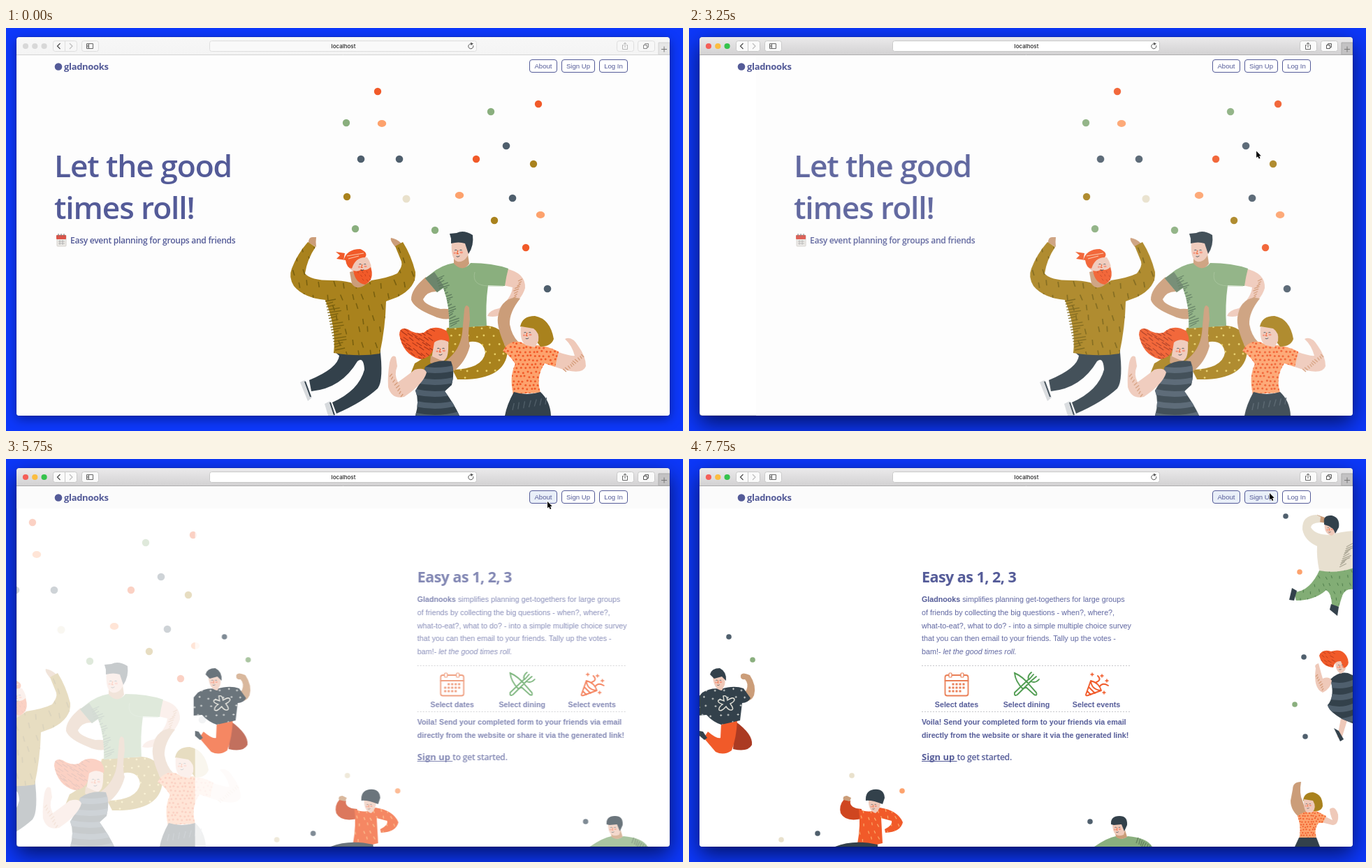
Recreate the animation shown at these times as an HTML page with a canvas. Size 969 px wide and 578 px high, loop 8 s.

```html
<!DOCTYPE html>
<html lang="en">
<head>
<meta charset="utf-8">
<title>Event planner</title>
<style>
html, body { margin: 0; width: 100%; height: 100%; overflow: hidden; background: #0d38fa; }
canvas { display: block; width: 969px; height: 578px; }
</style>
</head>
<body>
<canvas id="stage" width="969" height="578"></canvas>
<script>
const W = 969, H = 578, LOOP = 8000, STEP = 250;
const WIN = { x: 15, y: 13, w: 935, h: 543 };
const stage = document.getElementById('stage').getContext('2d');
let g = stage;

const INK = '#545b98', RED = '#f15a29', GREEN = '#8aaf7e', PEACH = '#fda26d', SLATE = '#4f5f6d',
  DARK = '#33414b', MUSTARD = '#a9821d', CREAM = '#e9e1cc', TAN = '#cb9d79', PALE = '#efc9b9';
const SANS = '"Liberation Sans", Arial, sans-serif', DISPLAY = '"Open Sans", sans-serif';

// ---- drawing helpers ----
function fill(color, d) {
  const p = new Path2D(d);
  g.fillStyle = color;
  g.fill(p);
  return p;
}
function line(color, width, d) {
  g.strokeStyle = color;
  g.lineWidth = width;
  g.stroke(new Path2D(d));
}
function dot(color, x, y, rx, ry = rx) {
  g.fillStyle = color;
  g.beginPath();
  g.ellipse(x, y, rx, ry, 0, 0, Math.PI * 2);
  g.fill();
}
function box(x, y, w, h, r, color, edge, width = 1) {
  g.beginPath();
  g.roundRect(x, y, w, h, r);
  if (color) { g.fillStyle = color; g.fill(); }
  if (edge) { g.strokeStyle = edge; g.lineWidth = width; g.stroke(); }
}
function text(str, x, y, font, color = INK, spacing = 0) {
  g.font = font;
  g.letterSpacing = spacing + 'px';
  g.fillStyle = color;
  g.fillText(str, x, y);
  return x + g.measureText(str).width;
}
function display(str, x, y, size, weight = 600) {
  return text(str, x, y, `${weight} ${size}px ${DISPLAY}`, INK, -0.025 * size);
}
function centered(str, x, y, font, color) {
  g.textAlign = 'center';
  text(str, x, y, font, color);
  g.textAlign = 'left';
}
function confetti(color, points, rx = 5, ry = rx) {
  points.forEach(([x, y]) => dot(color, x, y, rx, ry));
}

// Fills a shape with a jittered grid of small marks.
function texture(path, [x, y, w, h], gap, mark) {
  let seed = 7;
  const rnd = () => (seed = seed * 16807 % 2147483647) / 2147483647 - 0.5;
  g.save();
  g.clip(path);
  for (let row = 0, py = y; py < y + h; py += gap, row++)
    for (let px = x + (row % 2) * gap / 2; px < x + w; px += gap)
      mark(px + rnd() * gap * 0.4, py + rnd() * gap * 0.4, rnd());
  g.restore();
}
const spots = (color, r) => (x, y) => dot(color, x, y, r);
const dashes = (color, dx, dy, width = 1.6) => (x, y, k) =>
  line(color, width, `M${x},${y} l${dx + k * 3},${dy}`);
function hatch(color, x1, y1, x2, y2, n, len, rise = -3) {
  for (let i = 0; i <= n; i++) {
    const x = x1 + (x2 - x1) * i / n, y = y1 + (y2 - y1) * i / n;
    line(color, 1.3, `M${x},${y} l${len * (0.75 + 0.25 * Math.sin(i * 5))},${rise}`);
  }
}
function face(x, y, s = 1) {
  g.save();
  g.translate(x, y);
  g.scale(s, s);
  line(DARK, 1.1, 'M-6,-4 q2,-1.5 4,0 M3,-4 q2,-1.5 4,0 M-3,7 q3,2 6,-1');
  dot('#f59079', -6, 1, 2.2, 1.6);
  dot('#f59079', 6, 0, 2.8, 1.8);
  line(RED, 1.4, 'M0,-4 L-2,2 L1,2');
  g.restore();
}
function stripes(path, x, y, w, h) {
  g.save();
  g.clip(path);
  for (let py = y; py < y + h; py += 17)
    line(SLATE, 8, `M${x},${py} Q${x + w / 2},${py + 9} ${x + w},${py - 2}`);
  g.restore();
}

// ---- landing page ----
function beardedMan() {
  fill('#d7dadd', 'M421,508 L428,505 L438,530 L432,535 Z M456,539 L464,535 L471,556 L461,556 Z');
  line(DARK, 2, 'M428,507 L436,529 M464,537 L470,555');
  fill(DARK, 'M470,464 Q505,472 535,457 Q541,505 532,517 Q510,537 473,553 L467,537 Q505,520 513,490 Q512,471 503,478 Q480,517 437,521 L434,505 Q475,488 477,470 Z');
  fill(TAN, 'M433,308 Q433,299 440,300 L444,300 Q443,307 444,314 Z M557,314 Q549,304 551,301 Q559,302 566,309 Z');
  const d = 'M432,307 L443,314 Q431,332 428,352 Q435,362 466,362 Q481,362 493,365 Q508,375 523,362 Q548,358 560,352 Q568,342 566,335 L557,313 L568,307 Q580,326 586,350 Q588,372 560,386 L544,392 Q543,430 535,467 Q505,472 469,466 Q473,430 457,390 Q426,387 412,370 Q404,357 409,345 Q417,324 432,307 Z';
  const top = fill(MUSTARD, d);
  texture(top, [408, 312, 180, 155], 17, dashes('#79600f', 2, 8));
  hatch('#79600f', 457, 392, 471, 462, 17, 20);
  fill(TAN, 'M492,350 L502,347 L517,366 Q503,378 495,367 Z');
  fill(PALE, 'M491,344 Q489,331 503,328 L517,329 Q525,340 522,350 L504,357 Z');
  fill(RED, 'M483,334 Q487,317 507,317 Q519,322 514,329 Q500,329 495,345 Q488,345 486,333 L473,331 L478,326 L472,321 L485,323 Z');
  fill(RED, 'M497,348 Q505,350 508,346 Q516,349 522,343 Q528,361 514,368 Q500,366 497,348 Z');
  line('#fbc7a7', 1.2, 'M488,327 L512,323 M490,331 L505,327');
  texture(new Path2D('M498,350 Q520,346 523,348 Q526,364 514,367 Z'), [498, 348, 28, 20], 6, dashes('#c9401b', 1, 3, 1));
  face(510, 342, 0.75);
}
function tallMan() {
  fill(MUSTARD, 'M620,446 Q606,470 585,481 L573,511 L600,506 L640,470 Z');
  const legs = fill(MUSTARD, 'M631,430 L689,427 Q719,430 718,463 Q715,506 646,504 L639,490 Q682,489 686,466 Q684,448 664,450 Q653,456 652,476 L620,490 Z');
  texture(legs, [620, 430, 100, 75], 12, spots('#e8cf67', 1.4));
  fill(PALE, 'M715,345 Q744,351 743,373 Q738,391 715,405 Q705,417 689,413 Q691,405 706,402 Q724,386 725,372 L712,369 Z');
  hatch('#d49b78', 739, 360, 728, 392, 9, -8, 3);
  fill(TAN, 'M601,357 Q579,375 580,390 Q584,402 612,413 Q626,420 641,416 L646,405 Q632,402 622,403 Q599,397 597,389 Q603,377 617,378 Z');
  const shirt = fill(GREEN, 'M609,352 Q623,340 641,337 Q655,350 665,337 Q696,337 719,345 Q716,356 714,370 L690,369 Q686,398 688,427 L634,431 Q636,400 626,373 L617,379 L600,359 Z');
  fill('#6c856c', 'M613,350 L600,359 L617,379 L627,371 Z');
  g.save(); g.clip(shirt);
  hatch('#5d7b5d', 616, 360, 636, 428, 20, 15, -5);
  g.restore();
  line('#a6c39a', 0.8, 'M671,350 Q666,369 690,370 L712,370');
  fill(TAN, 'M641,331 L661,324 L663,338 Q654,351 641,338 Z');
  fill(PALE, 'M638,304 L657,306 L664,318 Q659,337 646,335 Q636,332 638,304 Z');
  fill(DARK, 'M637,302 L635,295 L645,294 Q655,289 668,297 Q670,312 662,324 L657,309 Q648,306 637,309 Z');
  face(647, 322, 0.8);
}
function redHairedWoman() {
  fill(TAN, 'M656,404 Q658,394 663,401 L664,418 Q660,445 664,456 Q658,479 641,492 L630,477 Q650,462 653,437 Z');
  const hair = fill(RED, 'M563,440 Q563,428 575,432 Q587,440 598,437 Q612,424 630,434 Q636,444 634,450 Q615,446 612,459 Q608,474 592,475 Q568,468 563,440 Z');
  texture(hair, [563, 430, 44, 48], 7, dashes('#aa3519', 7, 5, 1.1));
  fill(PALE, 'M613,451 Q622,444 633,450 Q634,470 629,475 L622,482 L609,474 Z');
  fill(TAN, 'M608,470 L621,476 L628,478 Q618,486 607,480 Z');
  face(622, 463, 0.8);
  const dress = fill(DARK, 'M600,486 Q615,475 637,478 Q643,492 638,512 L628,521 Q642,540 649,556 L586,556 Q592,535 586,520 Q596,505 600,486 Z');
  stripes(dress, 582, 487, 70, 80);
  fill(PALE, 'M549,480 Q552,467 558,472 L560,485 Q555,497 561,508 Q575,498 585,490 Q599,486 602,494 Q598,510 570,529 Q552,533 547,515 Q546,498 549,480 Z');
  hatch('#d49b78', 549, 500, 565, 529, 7, 5, -4);
}
function blondeWoman() {
  fill(TAN, 'M711,396 Q721,384 736,388 Q720,408 721,425 Q724,441 733,450 L716,460 Q702,430 704,415 Q706,402 711,396 Z');
  fill(PALE, 'M788,464 Q808,471 814,470 Q810,455 800,446 Q810,441 819,456 Q830,471 830,485 Q825,500 786,486 Z');
  hatch('#d49b78', 827, 472, 802, 493, 9, -5, -4);
  const top = fill(PEACH, 'M716,456 Q730,444 745,455 Q770,453 791,464 L786,486 L771,481 Q758,500 765,523 L726,525 Q720,500 729,482 Q722,470 711,463 Z');
  texture(top, [710, 446, 82, 80], 6, spots(RED, 1.5));
  fill(DARK, 'M727,522 Q745,528 765,522 Q779,535 780,556 L714,556 Q717,540 727,522 Z');
  hatch('#52606a', 725, 548, 772, 540, 6, 3, -10);
  fill(MUSTARD, 'M736,428 Q739,413 757,413 Q779,417 784,446 Q780,457 765,457 L752,440 Z');
  fill(PALE, 'M737,428 L755,431 Q764,437 762,449 L757,458 L745,455 Q735,451 737,428 Z');
  face(746, 440, 0.75);
}
function notepad(x, y) {
  box(x, y, 13, 16, 1, '#eceae6', '#d5d2ce');
  box(x - 1, y, 14, 6, 1, '#dc5348');
  line('#a9a9aa', 0.8, `M${x + 2},${y + 9} h9 M${x + 2},${y + 12} h9 M${x + 4},${y + 7} v7 M${x + 8},${y + 7} v7`);
  line('#777', 1, `M${x + 2},${y - 2} v4 M${x + 6},${y - 2} v4 M${x + 10},${y - 2} v4`);
}
function landing() {
  g.fillStyle = '#fdfdfd';
  g.fillRect(15, 38, 935, 518);
  display('Let the good', 69, 214, 44.3);
  display('times roll!', 69, 274, 44.3);
  notepad(73, 297);
  display('Easy event planning for groups and friends', 92, 309, 12.1);
  confetti(RED, [[532, 91], [762, 109], [673, 188], [744, 315]], 5.2);
  confetti(GREEN, [[694, 120], [487, 136], [500, 288], [614, 290]], 5.2);
  confetti(PEACH, [[538, 137], [649, 240], [765, 268]], 6.2, 5);
  confetti(SLATE, [[508, 188], [563, 188], [716, 169], [725, 244], [775, 374]], 5.3);
  confetti(MUSTARD, [[755, 195], [488, 242], [699, 276]], 5.2);
  confetti(CREAM, [[573, 245]], 5.5);
  beardedMan();
  tallMan();
  redHairedWoman();
  blondeWoman();
}

// ---- about page ----
function starShirtMan() {
  fill('#ab3a22', 'M66,376 Q92,395 90,410 Q84,421 63,416 Z');
  fill(RED, 'M46,379 L69,374 Q68,400 61,418 Q50,426 38,420 L21,400 L27,391 Q40,402 45,400 Z');
  fill(DARK, 'M15,390 L20,391 L26,400 L22,403 L15,397 Z');
  fill(TAN, 'M76,347 Q88,350 93,339 Q97,325 87,310 Q76,305 74,310 Q73,317 80,316 Q86,322 82,332 L74,336 Z');
  const shirt = fill(DARK, 'M19,335 Q32,327 46,330 Q64,324 78,329 L88,343 Q84,350 76,350 L73,375 L46,381 Q34,377 25,367 L13,368 L13,342 Z');
  texture(shirt, [14, 331, 78, 50], 12, (x, y) => line('#dcdedb', 0.9, `M${x - 1.5},${y} h3 M${x},${y - 1.5} v3`));
  const star = 'M49,340 Q54,338 55,346 Q64,340 65,345 Q65,348 59,351 Q65,359 61,360 Q57,361 53,355 Q46,363 43,360 Q42,356 48,352 Q40,349 42,346 Q45,344 50,347 Z';
  fill(DARK, star);
  line('#e8e6dc', 1.4, star);
  fill(PALE, 'M34,311 L48,309 Q53,315 51,324 L47,332 Q35,331 34,311 Z');
  fill(DARK, 'M30,309 Q32,300 44,300 Q54,305 53,318 L47,312 L36,315 Z');
  face(42, 320, 0.6);
}
function beanieMan() {
  fill('#cf4620', 'M222,488 L231,490 Q229,501 247,502 L247,516 Q224,521 217,508 Q214,497 222,488 Z');
  fill(TAN, 'M221,489 Q219,483 226,483 L232,486 L230,491 Z');
  const top = fill(RED, 'M243,502 Q260,510 273,500 Q299,504 306,521 Q303,535 281,536 L280,531 Q292,525 290,519 L275,515 L277,551 Q258,557 241,552 Q246,525 243,502 Z');
  texture(top, [240, 503, 67, 50], 10, dashes('#fbae6c', 1, 4, 1.2));
  fill(PALE, 'M257,487 L274,489 Q275,502 267,508 Q256,505 257,487 Z');
  fill(DARK, 'M253,490 Q252,476 264,474 Q279,472 280,486 L277,495 Q262,489 253,490 Z');
  face(264, 498, 0.55);
  fill(DARK, 'M209,556 Q236,545 270,553 L270,556 Z');
}
function greenMan() {
  fill(GREEN, 'M580,556 Q599,543 611,541 Q619,548 628,541 Q655,543 663,556 Z');
  hatch('#63805f', 643, 543, 660, 554, 6, -4, 8);
  fill(TAN, 'M610,536 L624,532 L627,542 Q618,548 611,542 Z');
  fill(PALE, 'M606,522 L621,522 Q627,528 622,539 Q606,545 606,522 Z');
  fill(DARK, 'M604,524 Q603,512 616,512 Q628,512 627,525 L623,534 L619,524 L608,525 Z');
  face(613, 531, 0.6);
}
function leapingMan() {
  const legs = fill('#82ad75', 'M903,158 L952,148 L952,187 Q939,185 935,196 L930,212 L920,210 Q920,193 912,188 Q895,203 869,203 L866,191 Q889,190 903,158 Z');
  texture(legs, [866, 158, 86, 52], 10, dashes('#4f7d4d', 1, 4, 1));
  fill(DARK, 'M863,185 L870,189 L866,203 L859,202 Z M919,208 L930,212 L928,225 L917,216 Z');
  fill(TAN, 'M899,80 L913,85 L912,92 L899,90 Z');
  fill('#e8e0d0', 'M878,101 Q877,81 898,80 L904,83 L903,91 Q890,92 890,98 Q896,109 918,109 Q933,104 952,103 L952,156 Q926,165 902,160 Q898,140 899,125 Q881,117 878,101 Z');
  hatch('#aba695', 931, 155, 941, 126, 10, 13, -5);
  fill(PALE, 'M910,92 L926,95 Q929,104 920,110 Q908,107 910,92 Z');
  fill(DARK, 'M909,92 Q907,80 920,81 Q932,84 930,98 L925,107 Q923,97 909,94 Z');
  face(917, 101, 0.55);
}
function stripedWoman() {
  fill(PALE, 'M933,372 L942,375 L934,401 L928,399 Z');
  fill(DARK, 'M923,386 L930,390 L937,402 L932,405 Z');
  const dress = fill(DARK, 'M918,316 Q930,304 943,307 L952,311 L952,380 L935,373 Q916,362 914,353 Q925,340 918,316 Z');
  stripes(dress, 910, 321, 45, 65);
  fill(PALE, 'M897,300 Q894,295 901,293 Q904,305 907,315 Q916,311 920,318 Q918,330 907,335 Q893,329 897,300 Z');
  hatch('#d49b78', 897, 312, 906, 332, 6, 4, -3);
  fill(PALE, 'M925,286 L940,289 Q943,303 933,308 Q924,304 925,286 Z');
  const hair = fill(RED, 'M902,282 Q906,272 919,276 Q937,270 943,287 Q946,297 937,300 L933,290 Q924,289 922,299 Q906,298 902,282 Z');
  texture(hair, [902, 276, 20, 22], 6, dashes('#b13a1b', 4, 3, 0.8));
  face(932, 298, 0.55);
}
function wavingWoman() {
  fill(TAN, 'M864,474 Q864,463 876,463 Q873,480 878,490 Q881,502 887,506 L876,516 Q861,505 861,490 Z');
  fill(PALE, 'M909,512 L921,518 Q917,508 917,502 Q925,496 929,510 Q930,525 921,525 L905,521 Z');
  const top = fill(PEACH, 'M871,512 Q885,502 898,505 L912,512 L907,522 L901,522 Q894,530 898,544 L873,546 Q877,528 871,512 Z');
  texture(top, [870, 504, 43, 42], 4, spots(RED, 1.1));
  fill(DARK, 'M873,543 L898,543 L903,556 L867,556 Z');
  fill(MUSTARD, 'M879,490 Q880,478 893,478 Q907,481 907,498 Q905,506 894,505 Z');
  fill(PALE, 'M880,488 L893,490 Q899,500 892,507 L884,507 Q879,502 880,488 Z');
  face(886, 497, 0.55);
}
function icons() {
  const peach = '#ea7f56', green = '#4f9c50';
  g.lineCap = 'round';
  box(366.5, 310, 33, 29.5, 3, null, peach, 1.8);
  line(peach, 1.8, 'M366.5,318 H399.5');
  box(372, 307, 4, 6, 1, '#fff', peach, 1.2);
  box(389, 307, 4, 6, 1, '#fff', peach, 1.2);
  for (let i = 1; i < 14; i++)
    box(371.5 + (i % 5) * 5, 321.5 + Math.floor(i / 5) * 5, 3, 3, 0.5, peach);
  line(green, 1.9, 'M466,307 Q478,312 489,326 L497,335 Q499,340 494,338 L482,327 L478,330 Q467,319 466,307 Z M466,335 L486,316 Q484,311 490,306 M466,335 Q465,341 470,338 L489,319 Q496,322 501,316 M493,309 L487,316 M497,312 L490,318');
  line(RED, 1.9, 'M575,318 L568,338 Q568,340 571,339 L590,332 M575,318 Q587,321 590,332 M575,318 Q576,331 590,332 M572,327 L581,336 M570,333 L575,338 M583,320 Q591,317 585,311 M588,326 Q592,320 600,325');
  [[577, 309], [591, 311], [598, 318], [594, 335]].forEach(([x, y]) => line(RED, 1.4, `M${x - 2},${y} h4 M${x},${y - 2} v4`));
  g.lineCap = 'butt';
}
function about() {
  g.fillStyle = '#fff';
  g.fillRect(15, 38, 935, 518);
  const x = 333, light = `10.75px ${SANS}`, bold = `bold 10.7px ${SANS}`, soft = '#5f66a1';
  display('Easy as 1, 2, 3', x, 177, 21.5, 700);
  const end = text('Gladnooks', x, 205, bold);
  text(' simplifies planning get-togethers for large groups', end, 205, light, soft);
  ['of friends by collecting the big questions - when?, where?,',
    'what-to-eat?, what to do? - into a simple multiple choice survey',
    'that you can then email to your friends. Tally up the votes -']
    .forEach((row, i) => text(row, x, 224 + i * 18.6, light, soft));
  text('let the good times roll.', text('bam!- ', x, 280, light, soft), 280, 'italic ' + light, soft);
  g.setLineDash([2, 2]);
  line('#c6c6ca', 1, 'M333,296.5 H633 M333,362.5 H633');
  g.setLineDash([]);
  icons();
  centered('Select dates', 383, 355.5, bold, INK);
  centered('Select dining', 483, 355.5, bold, INK);
  centered('Select events', 583, 355.5, bold, INK);
  text('Voila! Send your completed form to your friends via email', x, 381, bold);
  text('directly from the website or share it via the generated link!', x, 399.5, bold);
  const next = text('Sign up ', x, 432, `700 13px ${DISPLAY}`);
  line(INK, 1, `M${x},433.5 H${next}`);
  display('to get started.', next, 432, 12.2);

  const r = 3.8;
  confetti(SLATE, [[57, 255], [184, 537], [574, 520], [854, 82], [880, 284], [882, 398]], r);
  confetti(GREEN, [[91, 288], [867, 352]], r);
  confetti(CREAM, [[233, 454], [132, 546]], r);
  confetti(PEACH, [[305, 476], [874, 162]], r);
  starShirtMan();
  beanieMan();
  greenMan();
  leapingMan();
  stripedWoman();
  wavingWoman();
}

function prerender(draw) {
  const c = document.createElement('canvas');
  c.width = W;
  c.height = H;
  g = c.getContext('2d');
  draw();
  g = stage;
  return c;
}
const pages = { landing: prerender(landing), about: prerender(about) };

// ---- browser window ----
function windowFrame(active) {
  g.fillStyle = '#0d38fa';
  g.fillRect(0, 0, W, H);
  g.save();
  g.shadowColor = `rgba(0,0,20,${active ? 0.65 : 0.4})`;
  g.shadowBlur = active ? 30 : 16;
  g.shadowOffsetY = active ? 11 : 5;
  box(WIN.x, WIN.y, WIN.w, WIN.h, 4, '#fff');
  g.restore();
  box(WIN.x, WIN.y, WIN.w, WIN.h, 4, null, 'rgba(0,0,40,.3)');
}
function toolbar(active, loading, progress) {
  const bar = g.createLinearGradient(0, 13, 0, 38);
  bar.addColorStop(0, active ? '#ebeaeb' : '#f7f7f7');
  bar.addColorStop(1, active ? '#d3d2d3' : '#f4f4f4');
  box(15, 13, 935, 25, [4, 4, 0, 0], bar);
  line(active ? '#aeadae' : '#d4d4d4', 1, 'M15,38.5 H950');
  const lights = active ? ['#f55f58', '#fbbd40', '#36c34c'] : ['#d8d8d8', '#d8d8d8', '#d8d8d8'];
  lights.forEach((c, i) => dot(c, 28 + i * 13.3, 26, 4.1));
  const edge = active ? '#c9c9c9' : '#dedede', face = active ? '#fafafa' : '#f7f7f7';
  [[67, 34], [108, 24], [874, 24], [904, 24]].forEach(([x, w]) => box(x + 0.5, 18.5, w, 15, 3, face, edge));
  line(edge, 1, 'M84.5,18 V34');
  line('#4c4c4c', 1.2, 'M77.5,22 L73.5,26 L77.5,30');
  line('#bdbdbd', 1.2, 'M91,22 L95,26 L91,30');
  line('#666', 1, 'M115.5,22.5 h9 v7 h-9 Z M118.5,22.5 v7 M116,25 h2 M116,27 h2');
  line(!active || loading ? '#b5b5b5' : '#666', 1, 'M884,24.5 h-1.5 v6 h7 v-6 H888 M886,28 v-7 M884,23 l2,-2 l2,2');
  line(active ? '#555' : '#888', 1, 'M914.5,24 v-1.5 h5 v5 h-1.5 M912.5,24.5 h5 v5 h-5 Z');
  box(934, 21, 16, 17, 0, active ? '#c3c2c3' : '#e6e6e6', active ? '#aaa' : '#d2d2d2');
  line('#777', 1, 'M938,30.5 h8 M942,26.5 v8');
  box(291.5, 18.5, 382, 15, 3, active ? '#fff' : '#f9f9f9', edge);
  centered('localhost', 483, 29, '500 8px Inter, sans-serif', '#222');
  if (loading) {
    line('#555', 1, 'M662.5,22.5 l7,7 M669.5,22.5 l-7,7');
    g.fillStyle = '#1b7df4';
    g.fillRect(292, 32, progress, 1.8);
  } else {
    line('#555', 1, 'M668.6,25 A3.5,3.5 0 1 1 666,22.8');
    fill('#555', 'M665,20.5 L669,22.6 L665.5,25 Z');
  }
}
function navButton(label, x, w, hot) {
  box(x + 0.5, 45.5, w, 18, 3.5, hot ? '#e9eff8' : '#fff', INK);
  centered(label, x + w / 2 + 0.5, 58, `9.6px ${SANS}`, INK);
}
function nav(t, tinted) {
  if (tinted) {
    g.fillStyle = 'rgba(250,250,250,.8)';
    g.fillRect(15, 39, 935, 32);
  }
  dot(INK, 75, 55.5, 5.3);
  display('gladnooks', 83, 59.5, 13, 700);
  navButton('About', 749, 39, t >= 5000);
  navButton('Sign Up', 795, 47, t >= 7750);
  navButton('Log In', 849, 40, false);
}

// ---- motion ----
const TRACK = [[1500, 733, 48], [2000, 802, 169], [2500, 802, 169], [3500, 814, 178],
  [4000, 814, 178], [5000, 775, 61], [6750, 775, 61], [7750, 831, 49]];
function cursor(t) {
  const i = TRACK.findIndex(k => k[0] > t);
  let [, x, y] = TRACK[i < 0 ? TRACK.length - 1 : Math.max(0, i - 1)];
  if (i > 0) {
    const [t0, x0, y0] = TRACK[i - 1], [t1, x1, y1] = TRACK[i];
    const k = (t - t0) / (t1 - t0), e = k * k * (3 - 2 * k);
    x = x0 + (x1 - x0) * e;
    y = y0 + (y1 - y0) * e;
  }
  g.save();
  g.translate(x, y);
  const arrow = 'M0,0 V9.5 L2.1,7.6 L3.7,11 L5.4,10.2 L3.9,7 L6.7,6.8 Z';
  line('#fff', 1.4, arrow);
  fill('#000', arrow);
  g.restore();
}
// Share of the slide still to go: a heavily damped spring.
const remaining = (t, start) => t < start ? 1 : Math.exp(-(t - start) / 229);
function page(name, shift, alpha) {
  g.globalAlpha = alpha;
  g.drawImage(pages[name], shift, 0);
  g.globalAlpha = 1;
}
function render(t) {
  const active = t >= 1750, loading = t >= 2000 && t < 2750;
  windowFrame(active);
  g.save();
  g.beginPath();
  g.roundRect(WIN.x, WIN.y, WIN.w, WIN.h, 4);
  g.clip();
  if (!loading) {
    const out = remaining(t, 5453);
    if (t < 2000) page('landing', 0, 1);
    else if (out === 1) {
      const left = remaining(t, 2690);
      page('landing', WIN.w * left, 1 - left);
    } else {
      page('landing', -680 * (1 - out), out);
      page('about', WIN.w * out, 1 - out);
    }
    nav(t, out < 1);
  }
  toolbar(active, loading, t < 2250 ? 30 : t < 2500 ? 42 : 70);
  g.restore();
  if (t >= 1500) cursor(t);
}
function tick() {
  render(Math.floor(performance.now() % LOOP / STEP) * STEP);
  requestAnimationFrame(tick);
}
tick();
</script>
</body>
</html>
```
